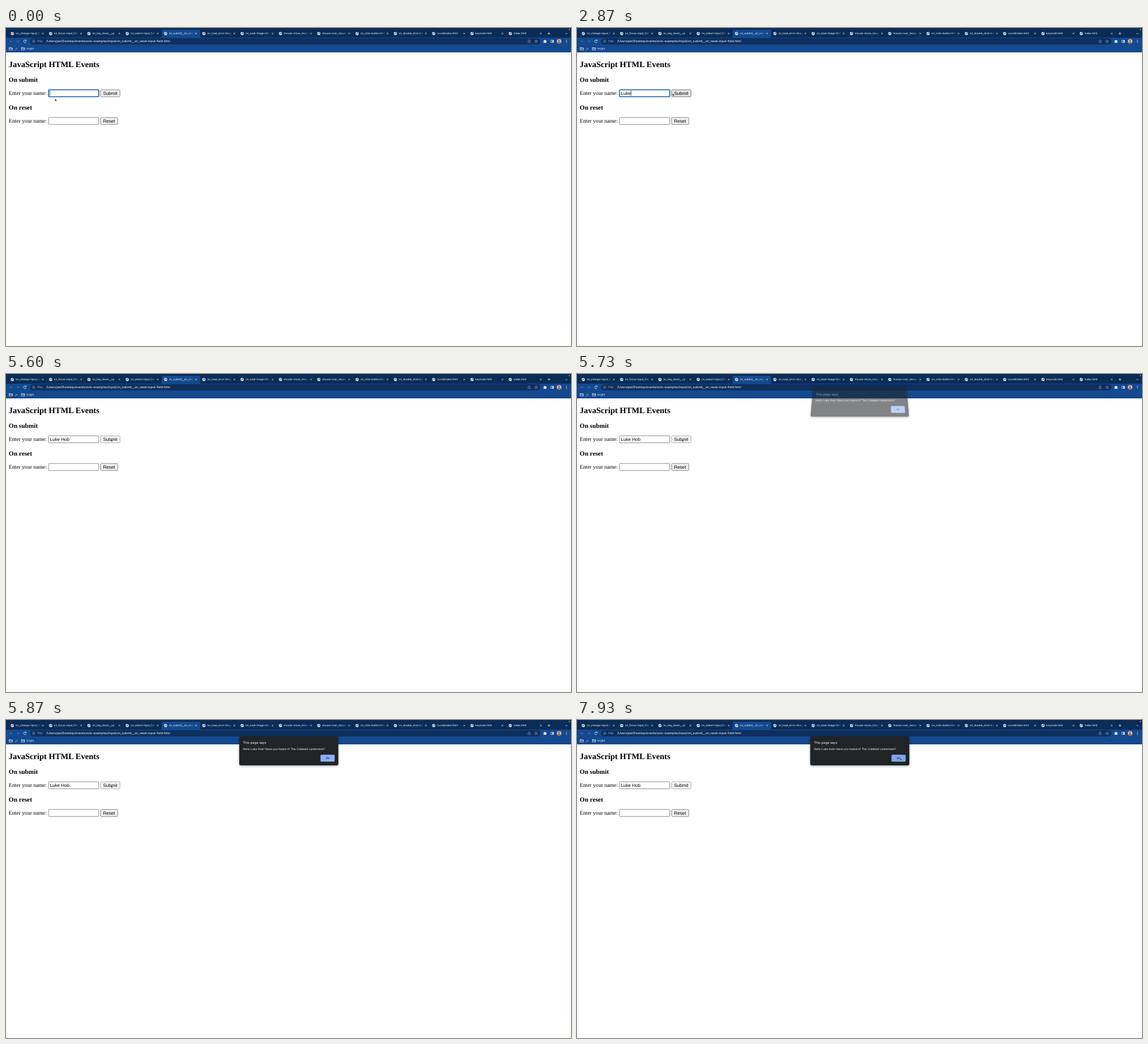
An HTML page that plays this animation: 998x561 px, repeating every 8000 ms.

```html
<!DOCTYPE html>
<html lang="en">
<head>
<meta charset="utf-8">
<title>JavaScript HTML Events</title>
<style>
  html, body { margin: 0; width: 100%; height: 100%; overflow: hidden; background: #fff; }
  svg { position: absolute; left: 0; top: 0; display: block; }
  text { white-space: pre; text-rendering: geometricPrecision; }
  .ui { font: 4.65px Inter, Roboto, sans-serif; fill: #fff; }
  .url { font-size: 5.42px; }
  .serif { font: 9.7px "Liberation Serif", serif; }
  .h2 { font: bold 14.55px "Liberation Serif", serif; }
  .h3 { font: bold 11.35px "Liberation Serif", serif; }
  .field { font: 8.08px "Liberation Sans", sans-serif; }
  .line { fill: none; stroke: #fff; stroke-width: .7; }
  #dialog { left: 411.5px; top: 29px; overflow: visible; transform-origin: 50% 100%;
            filter: drop-shadow(0 1px 2px rgba(0,0,0,.4)); }
</style>
</head>
<body>
<svg id="stage" width="998" height="561" viewBox="0 0 998 561">
  <defs>
    <linearGradient id="fade" gradientUnits="userSpaceOnUse" x1="53" x2="61" y1="0" y2="0">
      <stop offset="0" stop-color="#fff"/><stop offset="1" stop-color="#fff" stop-opacity="0"/>
    </linearGradient>
    <g id="globe">
      <circle r="2.8" fill="#f1f3f6"/>
      <path d="M-2.1-.9 L-.4 .2 L-.5 1.9 L-1.5 1 Z M.2-2 L1.9-.8 L1.2 .7 L-.1-.5 Z" fill="#0b2c57"/>
    </g>
    <path id="folder" class="line" d="M0 .4 H2.2 L2.9 1.1 H5.8 V4.7 H0 Z M0 2 H5.8"/>
  </defs>

  <rect width="998" height="561" fill="#fff"/>
  <path d="M.3 43 V560.6 H997.6 V43" fill="none" stroke="#e4e6ea" stroke-width=".6"/>
  <rect width="998" height="18" fill="#0b2c57"/>
  <rect y="17" width="998" height="26" fill="#14498f"/>
  <path d="M273 17.5 Q275 17 275 15 V5.500 Q275 3 277.500 3 H340.500 Q343 3 343 5.500 V15 Q343 17 345 17.500 Z" fill="#14498f"/>
  <g id="tabs" class="ui"></g>
  <path class="line" d="M956.7 9.700 H961.300 M959 7.400 V12 M988.400 9 L990 10.600 L991.600 9"/>
  <circle cx="995.2" cy="2.800" r="1" fill="#f0a04b"/>

  <rect x="42.500" y="18" width="901.500" height="11" rx="5.500" fill="#0e2f5e"/>
  <path class="line" style="stroke:#5481bd" d="M11.500 23.400 H6.700 M8.900 21.200 L6.700 23.400 L8.900 25.600 M18.500 23.400 H23.300 M21.100 21.200 L23.300 23.400 L21.100 25.600"/>
  <path class="line" d="M35.300 22 A2.300 2.300 0 1 0 35.600 24.300 M35.700 20.700 V22.600 H33.800"/>
  <g class="line" style="stroke:#b4c2d6;stroke-width:.5">
    <circle cx="49" cy="23.400" r="2.200"/>
    <path d="M49 23 V24.700 M49 21.900 V22.400 M923 22.600 H922 V25.800 H926 V22.600 H925 M924 24.300 V20.600 M923 21.500 L924 20.500 L925 21.500"/>
    <path d="M936.500 20.800 L937.200 22.700 L939.200 22.800 L937.600 24 L938.200 25.900 L936.500 24.800 L934.800 25.900 L935.400 24 L933.800 22.800 L935.800 22.700 Z"/>
  </g>
  <g class="ui">
    <text class="url" x="55.500" y="25.300" fill-opacity=".65">File</text>
    <text class="url" x="71" y="25.300">/Users/pel/Desktop/events/solo-examples/input/on_submit__on_reset-input-field.html</text>
    <text x="15" y="38.200">_n</text>
    <text x="36.300" y="38.200">bright</text>
    <path d="M949.500 22 H951 A1 1 0 0 1 953 22 H954.300 V23.300 A1 1 0 0 1 954.300 25.200 V26 H949.500 V24.600 A.7 .7 0 0 0 949.500 23.200 Z"/>
    <path d="M962.400 21.200 H967.400 V25.800 H962.400 Z M963.100 21.900 V25.100 H965.300 V21.900 Z" fill-rule="evenodd"/>
    <circle cx="990" cy="21.400" r=".6"/><circle cx="990" cy="23.400" r=".6"/><circle cx="990" cy="25.400" r=".6"/>
  </g>
  <circle cx="977" cy="23.400" r="4" fill="#d9c3b0"/>
  <path d="M973.800 25.800 A3.400 2.600 0 0 1 980.200 25.800 A4 4 0 0 1 973.800 25.800 Z" fill="#a9674a"/>
  <circle cx="977" cy="22.200" r="1.600" fill="#a9674a"/>
  <use href="#folder" x="5.600" y="34"/><use href="#folder" x="27.200" y="34"/>

  <text class="h2" x="4.850" y="68.500">JavaScript HTML Events</text>
  <text class="h3" x="4.850" y="94.500">On submit</text>
  <text class="serif" x="4.850" y="117.900">Enter your name:</text>
  <text class="h3" x="4.850" y="143.700">On reset</text>
  <text class="serif" x="4.850" y="166.900">Enter your name:</text>
  <g fill="#fff" stroke="#6b6b6b" stroke-width=".8">
    <rect id="input" x="75.200" y="109" width="88.600" height="12.300" rx="1"/>
    <rect x="75.200" y="157.900" width="88.600" height="12.300" rx="1"/>
    <rect id="submit" x="167" y="109" width="34.300" height="12.300" rx="1.600"/>
    <rect x="167" y="157.900" width="30.400" height="12.300" rx="1.600" fill="#efefef"/>
  </g>
  <g class="field">
    <text id="typed" x="77.400" y="117.900"></text>
    <text x="171.400" y="117.900">Submit</text>
    <text x="171.400" y="166.800">Reset</text>
  </g>
  <rect id="caret" y="110.500" width=".7" height="9"/>
</svg>

<svg id="dialog" width="175" height="51" viewBox="0 0 175 51">
  <rect width="175" height="51" rx="3" fill="#202427"/>
  <g class="ui" fill="#e8eaed">
    <text x="6.500" y="12.800" font-size="5.810" style="font-size:5.81px">This page says</text>
    <text x="6.500" y="24" style="font-size:5.04px">Hello Luke Hob! Have you heard of The Cobbled Lanternists?</text>
  </g>
  <rect id="ok" x="143.500" y="32.200" width="25" height="12.300" rx="1.500"/>
  <text class="ui" x="156" y="40.100" text-anchor="middle" style="fill:#202427;font-weight:500">OK</text>
</svg>

<svg width="998" height="561" viewBox="0 0 998 561">
  <path id="arrow" d="M0 0 V4.700 L1.100 3.700 L1.900 5.500 L2.700 5.100 L1.900 3.400 H3.400 Z" stroke="#fff" stroke-width=".5"/>
  <path id="beam" d="M-1.300-3.500 Q0-3.500 0-2.700 Q0-3.500 1.300-3.500 M0-2.700 V2.700 M-1.300 3.500 Q0 3.500 0 2.700 Q0 3.500 1.300 3.500" fill="none" stroke="#222" stroke-width=".6"/>
</svg>

<script>
const LOOP = 8000, STEP = 1000 / 15;
const $ = id => document.getElementById(id);

const tabNames = [
  'on_change-input_field', 'on_focus-input_field', 'on_key_down__up', 'on_select-input_field',
  'on_submit__on_reset', 'on_load_error-image', 'on_load-image.html', 'mouse-move_mouse',
  'mouse-over_mouse-out', 'on_click-button.html', 'on_double_click-button',
  'coordinates.html', 'keycode.html', 'index.html'
];
$('tabs').innerHTML = tabNames.map((name, i) => `
  <g transform="translate(${i * 67.66} 0)">
    <use href="#globe" x="11.200" y="9.800"/>
    <text x="17.200" y="11.400" style="fill:url(#fade)">${name}</text>
    <path class="line" style="stroke-width:.6" d="M63.600 8.300 l2.800 2.800 m0 -2.800 l-2.800 2.800"/>
  </g>`).join('');

// Each key press: time, text in the field.
const typing = [
  [0, ''], [1130, 'L'], [1270, 'Lu'], [1470, 'Luk'], [1670, 'Luke'],
  [3270, 'Luke '], [3800, 'Luke H'], [4000, 'Luke Ho'], [4130, 'Luke Hob']
];
const caretOff = [[730, 1130], [2200, 2670], [3200, 3270], [4670, 5200], [5600, LOOP]];
const pointerHidden = [[1130, 2200], [3270, 4670]];

// Pointer path: time, x, y.
const path = [
  [0, 86.5, 124.5], [130, 146, 114], [330, 99, 109.7],
  [2133, 99, 109.2], [2400, 138, 113], [2670, 178, 119.5], [2800, 178, 119.5],
  [2870, 168.8, 115.2], [3000, 122, 114], [3134, 122, 114], [3200, 149, 114],
  [4670, 128, 115], [4870, 145, 120], [5000, 163, 125], [5130, 178, 123], [5270, 185.5, 114.7],
  [7200, 185.5, 114.7], [7330, 225, 106], [7530, 405, 66], [7670, 525, 43],
  [7800, 569, 50], [7930, 571.3, 67.3]
];

const within = (ranges, t) => ranges.some(([a, b]) => t >= a && t < b);
const lastBefore = (keys, t) => keys.reduce((found, key, i) => key[0] <= t ? i : found, 0);
const inBox = ([x, y], left, top, right, bottom) => x > left && x < right && y > top && y < bottom;
const show = (el, on) => el.style.display = on ? '' : 'none';
const paint = (el, attrs) => Object.entries(attrs).forEach(([k, v]) => el.setAttribute(k, v));

function pointerAt(t) {
  const i = lastBefore(path, t), [t0, x0, y0] = path[i];
  const [t1, x1, y1] = path[i + 1] || [LOOP, x0, y0];
  const p = (t - t0) / (t1 - t0);
  return [x0 + (x1 - x0) * p, y0 + (y1 - y0) * p];
}

function drawDialog(t, pointer) {
  const tilt = t >= 5870 ? 0 : t >= 5800 ? .35 : 1;
  show($('dialog'), t >= 5730);
  $('dialog').style.opacity = 1 - .43 * tilt;
  $('dialog').style.transform = tilt
    ? `translateY(${-4.7 * tilt}px) perspective(110px) rotateX(${6 * tilt}deg) scale(${1 - .005 * tilt}, ${1 + .03 * tilt})`
    : 'none';
  $('ok').setAttribute('fill', inBox(pointer, 555, 61, 580, 74) ? '#7fa5ec' : '#8ab0f5');
}

function render(time) {
  const t = Math.round(Math.floor((time + 4) / STEP) * STEP / 10) * 10;
  const pointer = pointerAt(t);
  const visible = !within(pointerHidden, t);
  const overField = inBox(pointer, 75, 108.5, 164, 121.5);
  const hover = visible && inBox(pointer, 167, 109, 201, 121.5);
  const focused = t < 5600;

  const typed = $('typed');
  typed.textContent = typing[lastBefore(typing, t)][1];
  show($('caret'), !within(caretOff, t));
  $('caret').setAttribute('x', 77.4 + (typed.textContent ? typed.getComputedTextLength() : 0));

  paint($('input'), focused ? { stroke: '#1658b8', 'stroke-width': 1.6 }
                            : { stroke: '#6b6b6b', 'stroke-width': .8 });
  paint($('submit'), !focused ? { fill: '#f5f5f5', stroke: '#999' }
                   : hover ? { fill: '#e3e3e3', stroke: '#505050' }
                   : { fill: '#efefef', stroke: '#6b6b6b' });

  show($('arrow'), visible && !overField);
  show($('beam'), visible && overField);
  for (const id of ['arrow', 'beam']) $(id).setAttribute('transform', `translate(${pointer})`);
  drawDialog(t, pointer);
}

const start = performance.now();
function tick(now) {
  render(Math.max(0, now - start) % LOOP);
  requestAnimationFrame(tick);
}
render(0);
requestAnimationFrame(tick);
</script>
</body>
</html>
```
